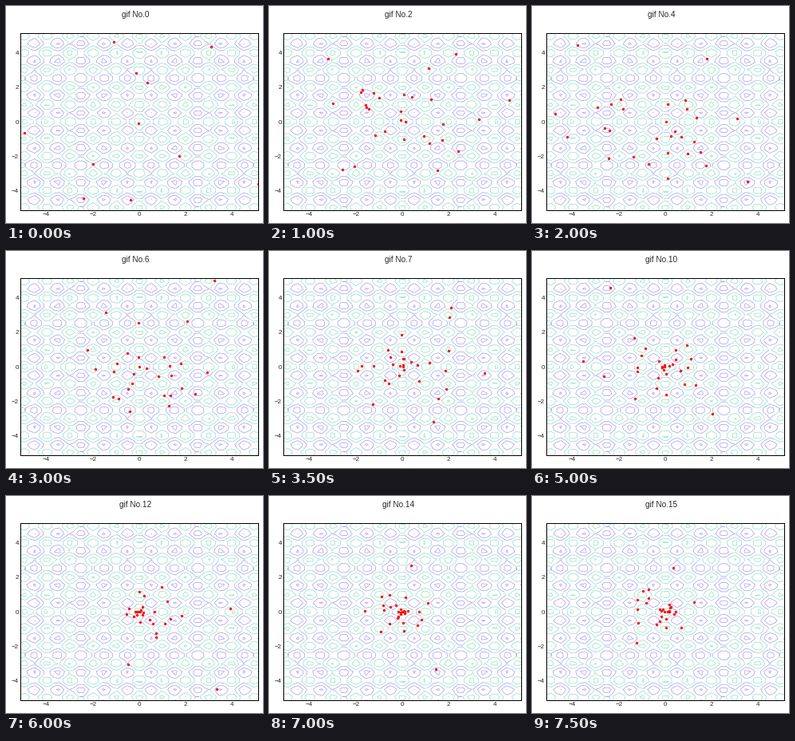
A matplotlib script for the animation above (8000 ms loop, 322 by 272 pixels).

```python
import numpy as np
import matplotlib.pyplot as plt
from matplotlib.animation import FuncAnimation
from matplotlib.collections import LineCollection

W, H, DPI = 322, 272, 64
PX = 72 / DPI
STEPS, STEP_MS = 16, 500
LIM, EDGE = 5.12, 5.17
COUNT = 30
LEFT, RIGHT, TOP, BOTTOM = 18, 316, 34, 256
MINT, VIOLET = "#93dcc0", "#a09af0"

plt.rcParams["font.family"] = "Liberation Sans"


def rastrigin(x, y):
    return 20 + x**2 + y**2 - 10 * (np.cos(2 * np.pi * x) + np.cos(2 * np.pi * y))


def simulate(inertia=0.8, pull=1.0):
    """Swarm drawn to each particle's best place and to the valley at the origin."""
    rng = np.random.default_rng(4)
    pos = np.clip(rng.uniform(-8, 8, (COUNT, 2)), -EDGE, EDGE)
    vel = rng.uniform(-1, 1, pos.shape)
    best, best_val = pos.copy(), rastrigin(*pos.T)
    track = [pos]
    for _ in range(STEPS - 1):
        r1, r2 = rng.random((2, COUNT, 1))
        vel = inertia * vel + pull * (r1 * (best - pos) - r2 * pos)
        pos = np.clip(pos + vel, -EDGE, EDGE)
        val = rastrigin(*pos.T)
        better = val < best_val
        best[better], best_val[better] = pos[better], val[better]
        track.append(pos)
    return track


def draw_landscape(ax):
    grid = np.linspace(-LIM, LIM, 50)
    x, y = np.meshgrid(grid, grid)
    lines = ax.contour(x, y, rastrigin(x, y), levels=np.arange(10, 90, 10))
    paths = [p for level in lines.allsegs for p in level if len(p) > 1]
    lines.remove()
    segs = np.concatenate([np.stack([p[:-1], p[1:]], axis=1) for p in paths])
    mid = segs.mean(axis=1)
    valley = np.cos(2 * np.pi * mid).sum(axis=1) > 0
    for part, color in ((segs[valley], MINT), (segs[~valley], VIOLET)):
        ax.add_collection(LineCollection(part, colors=color, linewidths=0.7 * PX,
                                         zorder=1))


fig = plt.figure(figsize=(W / DPI, H / DPI), dpi=DPI, facecolor="white")
ax = fig.add_axes([LEFT / W, 1 - BOTTOM / H, (RIGHT - LEFT) / W, (BOTTOM - TOP) / H])
draw_landscape(ax)
ax.set(xlim=(-LIM, LIM), ylim=(-LIM, LIM),
       xticks=range(-4, 5, 2), yticks=range(-4, 5, 2))
ax.tick_params(length=0, pad=2 * PX, labelsize=8 * PX, labelcolor="0.15")
for spine in ax.spines.values():
    spine.set(color="black", linewidth=PX)

title = fig.text(0.503, 1 - 14 / H, "", ha="center", va="baseline",
                 fontsize=10 * PX, color="0.15")
dots, = ax.plot([], [], "o", color="#fa0f14", ms=3.4 * PX, mew=0, zorder=2)
track = simulate()


def update(step):
    dots.set_data(*track[step].T)
    title.set_text(f"gif No.{step}")
    return dots, title


anim = FuncAnimation(fig, update, frames=STEPS, interval=STEP_MS,
                     repeat=True, repeat_delay=0)
plt.show()
```
